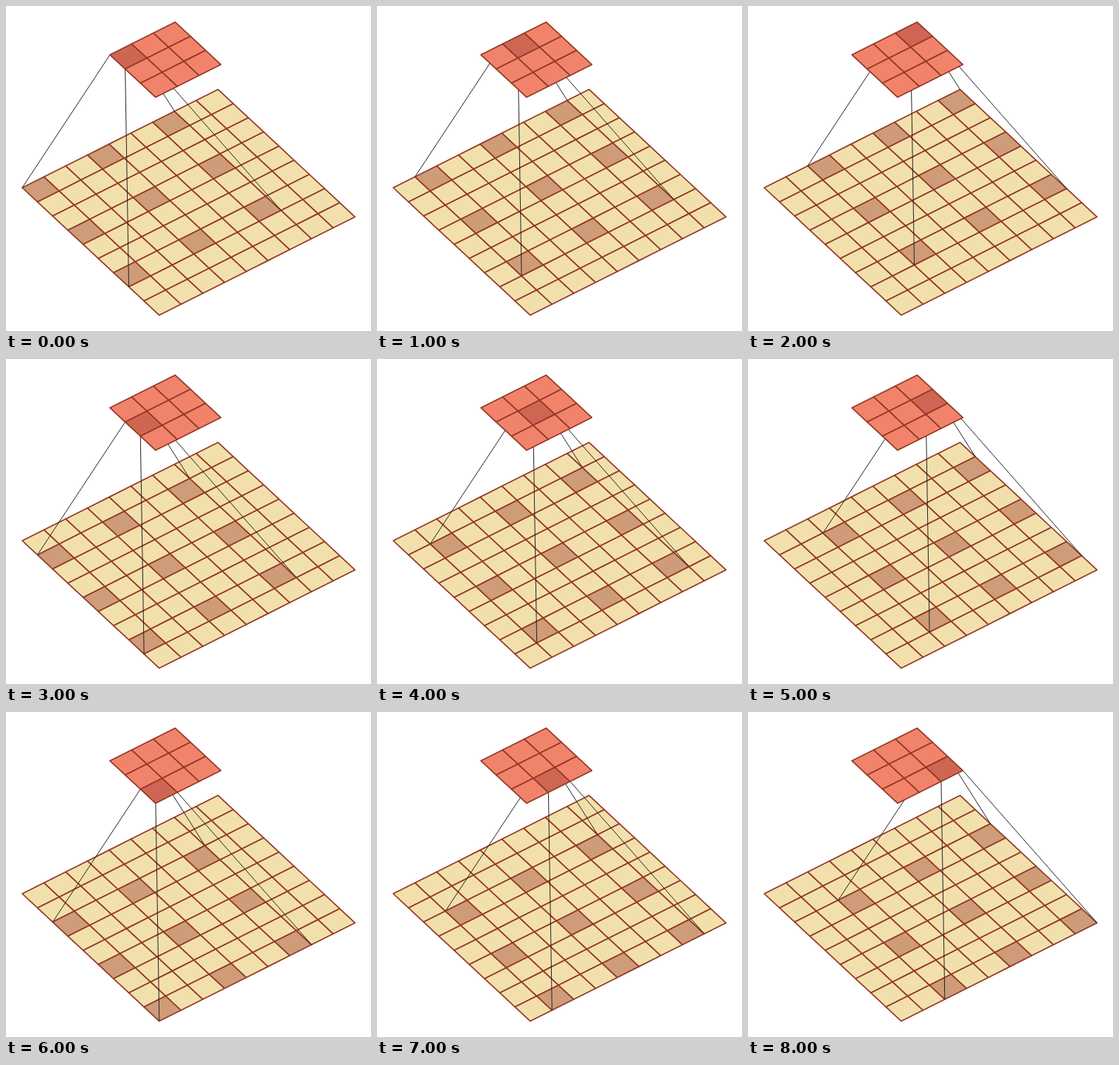
An HTML page for the animation above (9000 ms loop, 495 by 440 pixels).

```html
<!DOCTYPE html>
<html lang="en">
<head>
<meta charset="utf-8">
<title>Dilated convolution</title>
<style>
  html, body { margin: 0; width: 100%; height: 100%; overflow: hidden; background: #fff; }
  svg { display: block; }
</style>
</head>
<body>
<svg id="stage" width="495" height="440" viewBox="0 0 495 440"></svg>
<script>
const STEP = 1000, SIZE = 3, DILATION = 3, FIELD = 7;
const COL = [29.5, -14.78], ROW = [20.65, 19.17];
const EDGE = '#933826';
const stage = document.getElementById('stage');

function add(tag, attrs) {
  const el = document.createElementNS('http://www.w3.org/2000/svg', tag);
  for (const key in attrs) el.setAttribute(key, attrs[key]);
  return stage.appendChild(el);
}

// A plane maps (row, column) to a point on the stage.
const plane = (x, y) => (r, c) => [x + c * COL[0] + r * ROW[0], y + c * COL[1] + r * ROW[1]];
const input = plane(22, 246);
const output = plane(141, 66.1);

const corners = (at, r, c, n) => [at(r, c), at(r, c + n), at(r + n, c + n), at(r + n, c)];

function grid(at, n) {
  const cells = [];
  for (let r = 0; r < n; r++)
    for (let c = 0; c < n; c++)
      cells.push(add('polygon', {
        points: corners(at, r, c, 1).join(' '),
        stroke: EDGE, 'stroke-width': 1.7, 'stroke-linejoin': 'round'
      }));
  return cells;
}

const inputCells = grid(input, 9);
const rays = Array.from({ length: 4 }, () => add('line', { stroke: '#222', 'stroke-width': 1 }));
const outputCells = grid(output, SIZE);

function show(step) {
  const row = Math.floor(step / SIZE), col = step % SIZE;

  inputCells.forEach((cell, i) => {
    const r = Math.floor(i / 9), c = i % 9;
    const sampled = r % DILATION === row && c % DILATION === col;
    cell.setAttribute('fill', sampled ? '#ce9c79' : '#f2e0ac');
  });
  outputCells.forEach((cell, i) => cell.setAttribute('fill', i === step ? '#cf6653' : '#f2836b'));

  const from = corners(output, row, col, 1), to = corners(input, row, col, FIELD);
  rays.forEach((ray, i) => {
    [ray.x1, ray.y1, ray.x2, ray.y2].forEach((length, k) => {
      length.baseVal.value = [...from[i], ...to[i]][k];
    });
  });
}

const start = performance.now();
function tick() {
  show(Math.floor((performance.now() - start) / STEP) % (SIZE * SIZE));
  requestAnimationFrame(tick);
}
tick();
</script>
</body>
</html>
```
